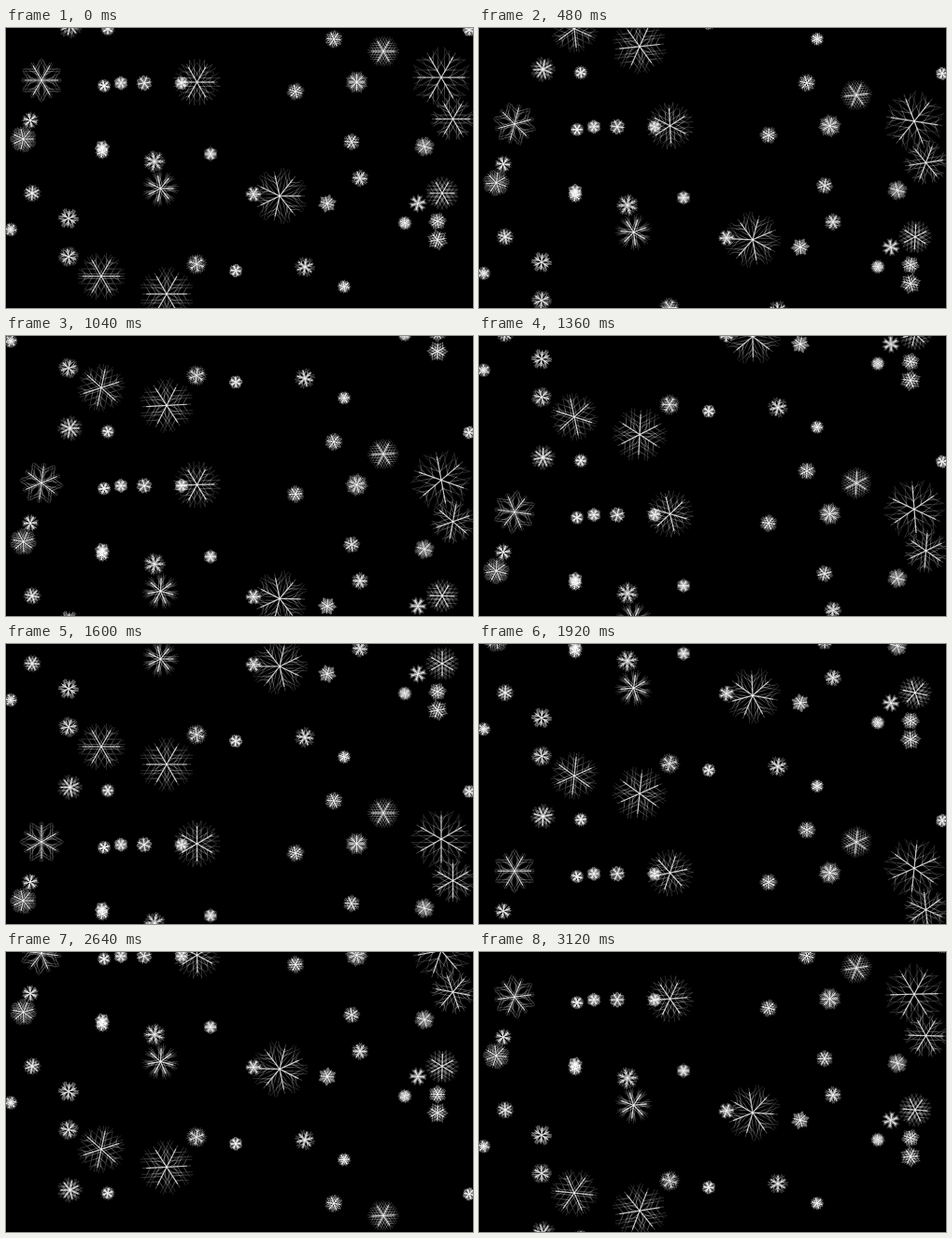
These frames come from a looping animation (500 by 300 pixels, 3200 ms). An HTML page with a canvas:

```html
<!DOCTYPE html>
<html>
<head>
<meta charset="utf-8">
<style>
html, body { margin: 0; width: 100%; height: 100%; overflow: hidden; background: #000; }
canvas { display: block; }
</style>
</head>
<body>
<canvas id="sky" width="500" height="300"></canvas>
<script>
const ctx = document.getElementById('sky').getContext('2d');
const STEPS = 40, STEP_MS = 80, FALL = 7.8, SPAN = FALL * STEPS, TOP = -6.5;

let seed = 11;
const random = () => (seed = seed * 16807 % 2147483647) / 2147483647;
const between = (a, b) => a + (b - a) * random();

// spin is counted in arm gaps per loop, so every flake ends as it began
function makeFlake(x, y, r, spin, arms = 6, phase = 0) {
  const gap = 2 * Math.PI / arms;
  const branches = [.15, .3, .45, .6].map(d => ({
    at: r * (d + between(-.06, .06)),
    angle: random() < .65 ? gap : gap / 2,
    reach: r * between(.8, 1.05)
  }));
  return { x, y, r, spin, arms, phase, gap, branches };
}

// x, y, radius, spin, arms
const flakes = [
  [38, 56, 24, 5], [102, 266, 27, -4], [172, 285, 29, 6], [204.5, 58, 25, 3],
  [466, 53, 34, 1], [478.5, 97.5, 25, -1], [404, 25, 17, 6], [293, 180, 30, -3, 7],
  [165.5, 172, 19, 4, 7], [467, 177, 18, -3], [68.5, -2.5, 13, 3, 7],
  [18.5, 119, 15, -4, 7], [375.5, 58, 12, 2, 8], [159, 143, 12, 3, 7]
].map(f => makeFlake(...f));

function scatter(r, points) {
  for (const [x, y] of points) {
    flakes.push(makeFlake(x, y, r, Math.round(between(-6, 6)), 6, random()));
  }
}
scatter(7.5, [[109, 1], [105, 62], [123, 59], [188, 59], [103, 128], [103, 133],
  [219, 135], [427, 209], [5, 216], [246, 260], [362, 277], [496, 2]]);
scatter(9.5, [[148, 59], [310, 68], [351, 12], [26, 99], [370, 122], [379, 161],
  [344, 188], [265, 178], [441, 188], [462, 207], [28, 177]]);
scatter(11, [[448, 127], [462, 227], [67, 204], [67, 245], [204, 253], [320, 256]]);

function line(x, y, angle, from, to, alpha, width) {
  const c = Math.cos(angle), s = Math.sin(angle);
  ctx.globalAlpha = alpha;
  ctx.lineWidth = width;
  ctx.beginPath();
  ctx.moveTo(x + from * c, y + from * s);
  ctx.lineTo(x + to * c, y + to * s);
  ctx.stroke();
}

function drawFlake({ x, y, r, spin, arms, phase, gap, branches }, step) {
  const alpha = .2 + 2 / r;
  ctx.save();
  ctx.translate(x, (y + FALL * step - TOP) % SPAN + TOP);
  ctx.rotate(gap * (phase + spin * step / STEPS));
  for (let i = 0; i < arms; i++) {
    line(0, 0, 0, 0, r * .9, alpha, 1);
    line(0, 0, 0, 0, r * .75, .7, 1.2);
    for (const { at, angle, reach } of branches) {
      // both ends stop on the circle of radius reach; the inner half is brighter
      const mid = at * Math.cos(angle);
      const half = Math.sqrt(reach ** 2 - (at * Math.sin(angle)) ** 2);
      for (const side of [angle, -angle]) {
        line(at, 0, side, 0, half - mid, alpha * .7, .8);
        line(at, 0, side, 0, (half - mid) / 2, alpha * .7, .9);
      }
    }
    ctx.rotate(gap);
  }
  ctx.restore();
}

const start = performance.now();
function draw() {
  const step = Math.floor((performance.now() - start) / STEP_MS) % STEPS;
  ctx.globalAlpha = 1;
  ctx.fillStyle = '#000';
  ctx.fillRect(0, 0, 500, 300);
  ctx.strokeStyle = '#fff';
  for (const flake of flakes) drawFlake(flake, step);
  requestAnimationFrame(draw);
}
draw();
</script>
</body>
</html>
```
